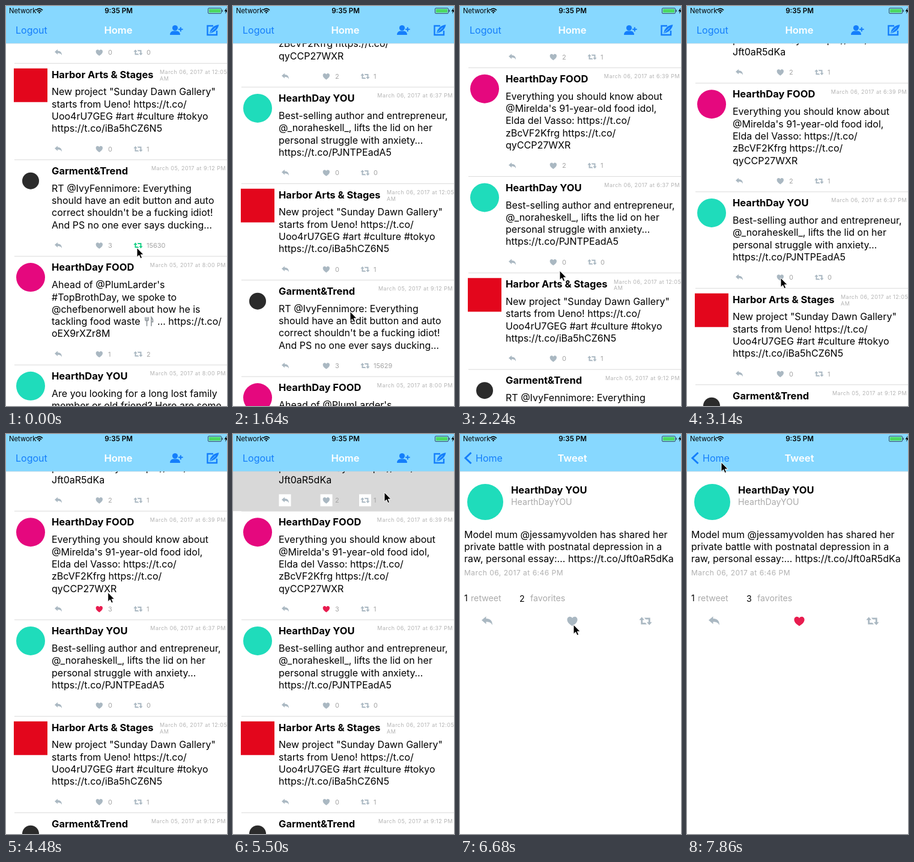
These frames come from a looping animation (368x665 px, 8 s). An HTML page:

```html
<!DOCTYPE html>
<html lang="en">
<head>
<meta charset="utf-8">
<title>Timeline</title>
<style>
html, body { margin: 0; width: 100%; height: 100%; overflow: hidden; background: #fff; }
svg { display: block; width: 100vw; height: 100vh; font: 16px Inter, "Open Sans", sans-serif; }
.name { font-weight: 700; font-size: 16.5px; }
.date { font-size: 9px; letter-spacing: .48px; fill: #b4b4b4; }
.right { text-anchor: end; }
.count { font-size: 11px; fill: #a3a3a3; }
.title { font-weight: 600; font-size: 16.6px; fill: #fff; text-anchor: middle; }
.link { fill: #147efb; }
.status { font-size: 11.3px; }
.clock { font-size: 11.6px; font-weight: 600; text-anchor: middle; }
.small { font-size: 14.2px; }
.soft { fill: #aaa; }
.stamp { font-size: 12px; letter-spacing: .5px; fill: #b0b0b0; }
.icon { fill: #aab8c2; }
</style>
</head>
<body>
<svg id="stage" viewBox="0 0 368 665"></svg>
<script>
const W = 368, PINK = '#e5087e', TEAL = '#1fdcbb', RED = '#e81c4f', GREEN = '#19cf86', GREY = '#aab8c2';

const icons = {
  reply: '<path d="M-6-1L-1-5.2V-2.6C3-2.6 6-1 6 4.6C4.5 1.6 2 .9-1 .9V3.4Z"/>',
  heart: '<path d="M0 5.5C-4 3-5.7 1-5.7-1.6C-5.7-5-1.5-6 0-3.2C1.5-6 5.7-5 5.7-1.6C5.7 1 4 3 0 5.5Z"/>',
  retweet: ['', 'transform="rotate(180)"'].map(a =>
    `<path ${a} d="M-4.5-4.8L-7.6-1.2H-5.5V4H1.5L-.2 2H-3.5V-1.2H-1.4Z"/>`).join('')
};
const cutlery = '<path fill="none" stroke="#8d9499" stroke-width="1.6" d="M-6-7V-2Q-3.5 1-1-2V-7M-3.5-7V8M4 8V-7Q7-4 6.5 1H4"/>';

const text = (x, y, s, cls = '', id = '') => `<text x="${x}" y="${y}" class="${cls}" id="${id}">${s}</text>`;
const icon = (kind, x, y, scale = 1, id = '') =>
  `<g class="icon" id="${id}" transform="translate(${x} ${y}) scale(${scale})">${icons[kind]}</g>`;
const disc = (x, y, r, fill) => `<circle cx="${x}" cy="${y}" r="${r}" fill="${fill}"/>`;

const food = { name: 'HearthDay FOOD', logo: disc(41, 35, 24, PINK) };
const you = { name: 'HearthDay YOU', logo: disc(41, 35, 24, TEAL) };
const arts = { name: 'Harbor Arts &amp; Stages', logo: '<path fill="#e3061c" d="M13 8.5h56v56H13z"/>' };
const trend = { name: 'Garment&amp;Trend', logo: disc(41, 35, 14, '#2b2b2b') };

const posts = [
  { by: you, date: 'March 06, 2017 at 6:46 PM', likes: 2, shares: 1, lines: [
    'Model mum @jessamyvolden has', 'shared her private battle with', 'postnatal depression in a raw,',
    'personal essay:… https://t.co/', 'Jft0aR5dKa'] },
  { by: food, date: 'March 06, 2017 at 6:39 PM', likes: 2, shares: 1, lines: [
    'Everything you should know about', "@Mirelda's 91-year-old food idol,", 'Elda del Vasso: https://t.co/',
    'zBcVF2Kfrg https://t.co/', 'qyCCP27WXR'] },
  { by: you, date: 'March 06, 2017 at 6:37 PM', likes: 0, shares: 0, lines: [
    'Best-selling author and entrepreneur,', '@_noraheskell_, lifts the lid on her',
    'personal struggle with anxiety…', 'https://t.co/PJNTPEadA5'] },
  { by: arts, date: 'March 06, 2017 at 12:05|AM', likes: 0, shares: 1, lines: [
    'New project "Sunday Dawn Gallery"', 'starts from Ueno! https://t.co/',
    'Uoo4rU7GEG #art #culture #tokyo', 'https://t.co/iBa5hCZ6N5'] },
  { by: trend, date: 'March 05, 2017 at 9:12 PM', likes: 3, shares: 15630, lines: [
    'RT @IvyFennimore: Everything', 'should have an edit button and auto',
    "correct shouldn't be a fucking idiot!", 'And PS no one ever says ducking…'] },
  { by: food, date: 'March 05, 2017 at 8:00 PM', likes: 1, shares: 2, lines: [
    "Ahead of @PlumLarder's", '#TopBrothDay, we spoke to', '@chefbenorwell about how he is',
    'tackling food waste|… https://t.co/', 'oEX9rXZr8M'] },
  { by: you, date: 'March 05, 2017 at 8:00 PM', likes: 1, shares: 1, lines: [
    'Are you looking for a long lost family', 'member or old friend? Here are some'] }
];

let rowTop = -52.5;
function row(p, i) {
  const h = p.lines.length * 20.3 + 79.2, iy = h - 18;
  const dates = p.date.split('|');
  const body = p.lines.map((line, n) => {
    const y = 53.2 + n * 20.3, [a, b] = line.split('|');
    return text(76, y, a) + (b ? `<g transform="translate(238 ${y - 6})">${cutlery}</g>` + text(252, y, b) : '');
  }).join('');
  const pick = i ? '' : `<g id="pick"><path fill="#d8d8d8" d="M0 0H${W}V${h}H0z"/>` +
    [76.5, 145.5, 210].map(x => `<rect x="${x}" y="${iy - 10}" width="20" height="20" fill="#fff"/>`).join('') + '</g>';
  const out = `<g transform="translate(0 ${rowTop})">${pick}<path stroke="#dadada" d="M14 0H${W}"/>` +
    p.by.logo + text(76, 24.3, p.by.name, 'name') +
    (dates[1] ? text(256, 18, dates[0], 'date') + text(256, 28.3, dates[1], 'date')
              : text(366, 17.5, dates[0], 'date right')) +
    body + icon('reply', 87, iy) + icon('heart', 155.3, iy, 1, 'heart' + i) + icon('retweet', 220, iy, 1, 'share' + i) +
    text(170, iy + 4, p.likes, 'count', 'likes' + i) + text(234, iy + 4, p.shares, 'count', 'shares' + i) + '</g>';
  rowTop += h;
  return out;
}

const detail = `<path fill="#fff" d="M0 62H${W}V665H0z"/>` + disc(42, 113, 30, TEAL) +
  text(85, 98.5, you.name, 'name') + text(85, 118.3, 'HearthDayYOU', 'small soft') +
  ['Model mum @jessamyvolden has shared her', 'private battle with postnatal depression in a',
   'raw, personal essay:… https://t.co/Jft0aR5dKa'].map((s, n) => text(7, 172.7 + n * 20.3, s)).join('') +
  text(7, 234.5, 'March 06, 2017 at 6:46 PM', 'stamp') +
  text(7, 278.3, '1', 'small') + text(18, 278.3, 'retweet', 'small soft') +
  text(99, 279, '2', 'small', 'favs') + text(117, 278.3, 'favorites', 'small soft') +
  icon('reply', 45, 311, 1.5) + icon('heart', 187, 311, 1.5, 'favHeart') + icon('retweet', 309, 311, 1.4);

const bar = `<path fill="#87d8ff" d="M0 0H${W}V62H0z"/><path stroke="#b9cdd8" stroke-width=".6" d="M0 62.3H${W}"/>` +
  text(5, 12.2, 'Network', 'status') + text(187.5, 12.2, '9:35 PM', 'clock') +
  `<g fill="none" stroke="#000" stroke-width="1.7"><path d="M50 7Q55.5 1.8 61 7M52.2 9.2Q55.5 6 58.8 9.2"/></g>
  <path d="M53.7 10.6Q55.5 9 57.3 10.6L55.5 12.4Z"/>
  <rect x="336.5" y="3.5" width="22" height="9" rx="1.5" fill="none" stroke="#33505e"/>
  <path fill="#4cd964" d="M338 5h19v6h-19z"/><path fill="#33505e" d="M359.5 6.3h1.5v3.4h-1.5z"/>
  <path d="M367.5 3L363.5 8.7H366L365 13L369 7H366.6Z"/>
  <g id="listBar">${text(16, 46, 'Logout', 'link')}
    <g class="link"><circle cx="281.5" cy="36.5" r="4.6"/><path d="M273 48Q273 42 279 41.5H284Q290 42 290 48Z"/>
    <path d="M289.8 35.2h2v2.6h2.8v2h-2.8v2.6h-2v-2.6H287v-2h2.8z"/></g>
    <path fill="none" stroke="#147efb" stroke-width="2.4" d="M345 33H335.5V48H351V41"/>
    <path class="link" d="M339 45.5L340.5 40Q345 32 354.5 31Q353 40 344 44Z"/><path stroke="#87d8ff" d="M340 44.5L349 36"/>
  </g>` + text(187, 46, 'Home', 'title', 'home') + text(187, 46, 'Tweet', 'title', 'tweet') +
  `<g id="back"><path fill="none" stroke="#147efb" stroke-width="3" d="M18.5 31L9 40L18.5 49"/>${text(26, 46, 'Home', 'link')}</g>`;

document.getElementById('stage').innerHTML =
  `<g id="under"><path fill="#fff" d="M0 0H${W}V665H0z"/><g id="list">${posts.map(row).join('')}</g></g>
  <path id="shade" d="M0 62H${W}V665H0z"/><g id="detail">${detail}</g>${bar}
  <path id="cursor" stroke="#fff" d="M0 0V15.5L3.6 12.2L6 17.7L8.6 16.5L6.3 11.3H11Z"/>`;

const $ = id => document.getElementById(id);
const move = (id, x, y = 0) => $(id).setAttribute('transform', `translate(${x} ${y})`);
const fade = (id, a) => $(id).setAttribute('opacity', a);
const tint = (id, c) => $(id).style.fill = c;
const label = (id, s) => $(id).textContent = s;

// Linear track through [step, value...] points.
function along(track, k) {
  const j = track.findIndex(p => p[0] > k);
  if (j < 0) return track.at(-1).slice(1);
  const a = track[j - 1], b = track[j], f = (k - a[0]) / (b[0] - a[0]);
  return a.slice(1).map((v, i) => v + (b[i + 1] - v) * f);
}

const pointerTrack = [[0, 218, 402], [7, 218, 402], [8, 212, 345], [9, 208, 365], [10, 202, 430], [11, 195, 508],
  [15, 166, 440], [18, 157, 453], [20, 157, 453], [21, 156, 452], [24, 156, 291], [29, 156, 291],
  [36, 252, 97], [39, 252, 97], [45, 189, 317], [46, 189, 316], [47, 188, 310], [49, 188, 310],
  [50, 170, 270], [52, 78, 92], [53, 57, 47]];
const scrollTrack = [[0, -374], [8, -374], [9, -340], [10, -262], [11, -174], [12, -120], [13, -78], [14, -48],
  [15, -25.5], [16, -12], [17, -4], [18, 0]];
const slideTrack = [[0, W], [37, W], [38, 110], [39, 7], [40, 0]];

function draw(now) {
  const k = Math.floor(now % 8000 / 148.3 + .03);
  const [x] = along(slideTrack, k), p = 1 - x / W;
  move('cursor', ...along(pointerTrack, k));
  move('list', 0, along(scrollTrack, k)[0]);
  move('under', -.3 * W * p);
  move('detail', x);
  fade('shade', .1 * p);
  fade('pick', k >= 36 ? 1 : 0);

  fade('listBar', (1 - p) ** 2);
  fade('home', (1 - p) ** 2);
  move('home', -139 * p);
  fade('tweet', p ** 2);
  move('tweet', 60 * (1 - p));
  fade('back', p ** 12);

  const shared = k < 6, liked = k >= 25, faved = k >= 46;
  tint('share4', shared ? GREEN : GREY);
  label('shares4', shared ? 15630 : 15629);
  tint('heart1', liked ? RED : GREY);
  label('likes1', liked ? 3 : 2);
  tint('favHeart', faved ? RED : GREY);
  label('favs', faved ? 3 : 2);
}

const start = performance.now();
(function loop() {
  draw(performance.now() - start);
  requestAnimationFrame(loop);
})();
</script>
</body>
</html>
```
